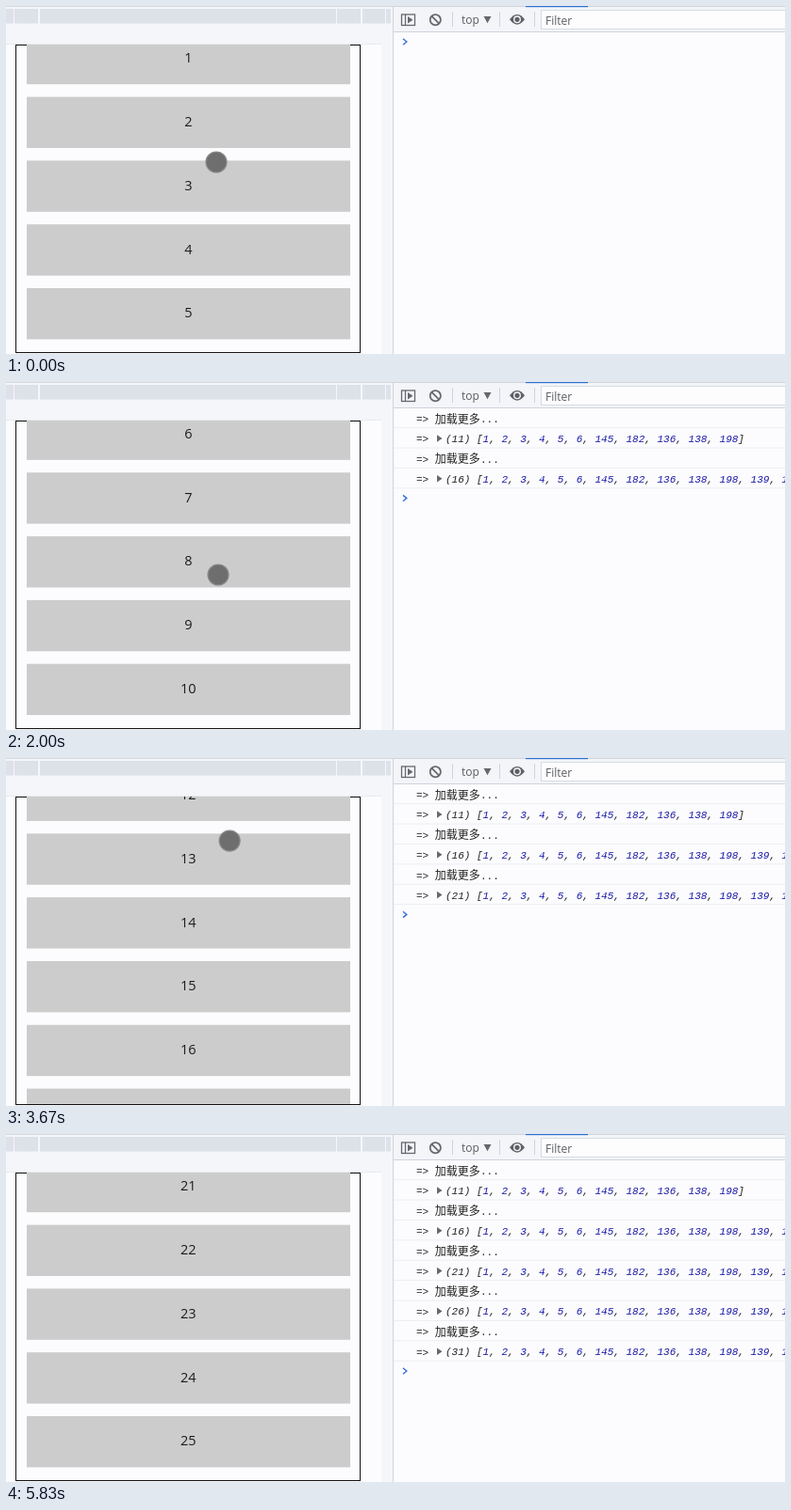
An HTML page that plays this animation: 826 px wide and 370 px high, repeating every 6760 ms.

```html
<!DOCTYPE html>
<html lang="zh">
<head>
<meta charset="utf-8">
<title>Load more on scroll</title>
<style>
  html, body { margin: 0; width: 100%; height: 100%; overflow: hidden; background: #fcfcfe; }
  svg { display: block; }
  text { white-space: pre; }
  .ui { font: 12px "Open Sans", "Noto Sans", sans-serif; fill: #5a5d62; }
  .num { font: 14.5px "Open Sans", "Noto Sans", sans-serif; fill: #1c1c1c; text-anchor: middle; }
  .log { font: 11px "Liberation Mono", "Noto Sans Mono", monospace; fill: #222; }
  .zh { font: 12px "Noto Sans CJK SC", "Noto Sans CJK", "Noto Sans CJK JP", sans-serif; fill: #222; }
  .it { font-style: italic; }
  .val { fill: #1a1aa6; }
</style>
</head>
<body>
<svg width="826" height="370" viewBox="0 0 826 370">
  <defs><clipPath id="view"><rect x="11" y="41" width="364" height="327"/></clipPath></defs>
  <rect width="826" height="370" fill="#fcfcfe"/>

  <!-- page frame -->
  <rect width="410" height="41" fill="#f5f6fa"/>
  <rect x="398" y="41" width="12" height="329" fill="#f5f6fa"/>
  <rect width="410" height="1" fill="#d4d8e0"/>
  <g id="ruler" fill="#dde1ea"></g>
  <path d="M0 40.5H398" stroke="#e8eaf0"/>
  <rect x="10.5" y="41.5" width="365" height="327" fill="#fcfcfe" stroke="#111"/>
  <g id="list" clip-path="url(#view)"></g>
  <circle id="dot" r="11" stroke-width="1.2"/>

  <!-- console toolbar -->
  <rect x="411" width="415" height="27" fill="#f4f5f9"/>
  <path d="M410.5 0V370M411 27.5H826M411 .5H826" stroke="#cfd3dc"/>
  <rect x="551" width="66" height="1.2" fill="#2f6fd0"/>
  <g fill="none" stroke="#65686c" stroke-width="1.3">
    <rect x="419.5" y="9" width="14" height="11.5"/>
    <path d="M423.5 9V20.5"/>
    <circle cx="455.3" cy="14.7" r="5.6" stroke-width="1.8"/>
    <path d="M451.4 10.8L459.2 18.6" stroke-width="1.8"/>
  </g>
  <path d="M426 11V18.5L431.5 14.7ZM506.5 11H514.5L510.5 18.2Z" fill="#65686c"/>
  <path d="M473.5 6V22M523.5 6V22M560.5 6V22" stroke="#cfd3dc"/>
  <path d="M534 14.3Q542 3.5 550 14.3Q542 25 534 14.3Z" fill="#5d6064"/>
  <circle cx="542" cy="14.3" r="3.3" fill="none" stroke="#f4f5f9" stroke-width="1.4"/>
  <text class="ui" x="483" y="19">top</text>
  <rect x="567.5" y="4.5" width="262" height="20" fill="#fdfdfe" stroke="#d8dbe2"/>
  <text class="ui" x="572" y="20">Filter</text>

  <g id="logs"></g>
  <path id="prompt" d="M421 -3.2L424.8 0L421 3.2" fill="none" stroke="#3b74e0" stroke-width="1.5"/>
</svg>
<script>
const LOOP = 6760, TICK = 1000 / 12;
const PITCH = 67.8, ROW = 21.4, PAGE = 5;
const $ = id => document.getElementById(id);

function add(parent, tag, attrs, text) {
  const el = document.createElementNS("http://www.w3.org/2000/svg", tag);
  for (const k in attrs) el.setAttribute(k, attrs[k]);
  if (text) el.textContent = text;
  parent.appendChild(el);
  return el;
}

// Each swipe moves the list by one page; its first third is the drag.
const swipes = [
  { start: 990, length: 480 },
  { start: 1990, length: 560 },
  { start: 3527, length: 430 },
  { start: 4788, length: 130 }
];
const loads = [250, 1750, 3000, 4250, 5330];

// Pointer moves: [from time, to time, x, y]
const home = [223, 166], HIDE = 5830;
const moves = [
  [100, 750, 225, 250], [1000, 1240, 226, 95],
  [1500, 1830, 225, 205], [2000, 2240, 236, 89],
  [3300, 3527, 233, 172], [3527, 3730, 239, 50],
  [4450, 4690, 241, 159], [4780, 4833, 244, 66], [4834, 4916, 246, 47],
  [5300, 5500, 255, 49], [5700, 5750, 369, 139]
];

const clamp = u => Math.max(0, Math.min(1, u));
const smooth = u => u * u * (3 - 2 * u);
const progress = (s, t) => clamp((t - s.start) / s.length);

function pointerAt(t) {
  let [x, y] = home;
  for (const [from, to, nx, ny] of moves) {
    const u = clamp((t - from) / (to - from));
    x += (nx - x) * u;
    y += (ny - y) * u;
  }
  return [x, y];
}

function isPressed(t) {
  return t < TICK / 2 || swipes.some(s => {
    const u = progress(s, t);
    return u > 0 && u < 1 / 3;
  });
}

for (const [x, end] of [[0, 8], [9, 34], [36, 350], [351, 376], [378, 402], [403, 408]])
  add($("ruler"), "rect", { x, y: 3, width: end - x, height: 15.5 });

const items = Array.from({ length: 26 }, (_, i) => {
  const g = add($("list"), "g", {});
  add(g, "rect", { x: 22, width: 343, height: 54.4, fill: "#ccc" });
  add(g, "text", { class: "num", x: 193.3, y: 31.4 }, String(i));
  return g;
});

function logPair(n) {
  const g = add($("logs"), "g", { transform: `translate(0 ${n * ROW * 2})` });
  for (const y of [0, ROW]) {
    add(g, "text", { class: "log", x: 435, y: 43 + y }, "=>");
    add(g, "path", { d: `M411 ${48.6 + y}H826`, stroke: "#eceef4" });
  }
  add(g, "text", { class: "zh", x: 454.8, y: 43.5 }, "加载更多");
  add(g, "text", { class: "log", x: 503, y: 43 }, "...");
  add(g, "path", { d: "M457 56.2V63.8L462.5 60Z", fill: "#65686c" });
  const line = add(g, "text", { class: "log it", x: 466, y: 64 });
  const values = [1, 2, 3, 4, 5, 6, 145, 182, 136, 138, 198];
  if (n) values.push(139, 154);
  add(line, "tspan", {}, `(${11 + PAGE * n}) [`);
  values.forEach((v, i) => {
    if (i) add(line, "tspan", {}, ", ");
    add(line, "tspan", { class: "val" }, String(v));
  });
  add(line, "tspan", {}, n ? ", " : "]");
  return g;
}
const logs = loads.map((_, n) => logPair(n));

function draw(ms) {
  const t = Math.floor((ms % LOOP + 5) / TICK) * TICK;

  const first = swipes.reduce((sum, s) => sum + PAGE * smooth(progress(s, t)), 1);
  items.forEach((g, i) => {
    const y = 28.8 + (i - first) * PITCH;
    g.setAttribute("transform", `translate(0 ${y.toFixed(2)})`);
    g.style.display = y > -20 && y < 367 ? "" : "none";
  });

  const count = loads.filter(l => t + 5 >= l).length;
  logs.forEach((g, n) => { g.style.display = n < count ? "" : "none"; });
  $("prompt").setAttribute("transform", `translate(0 ${38 + count * ROW * 2})`);

  const [x, y] = pointerAt(t), down = isPressed(t), dot = $("dot");
  dot.style.display = t + 5 < HIDE ? "" : "none";
  dot.setAttribute("cx", x);
  dot.setAttribute("cy", y);
  dot.setAttribute("fill", down ? "#6e6e6e" : "#8e8e8e");
  dot.setAttribute("stroke", down ? "#8a8a8a" : "#7c7c7c");
}

const start = performance.now();
function loop() {
  draw(performance.now() - start);
  requestAnimationFrame(loop);
}
draw(0);
requestAnimationFrame(loop);
</script>
</body>
</html>
```
